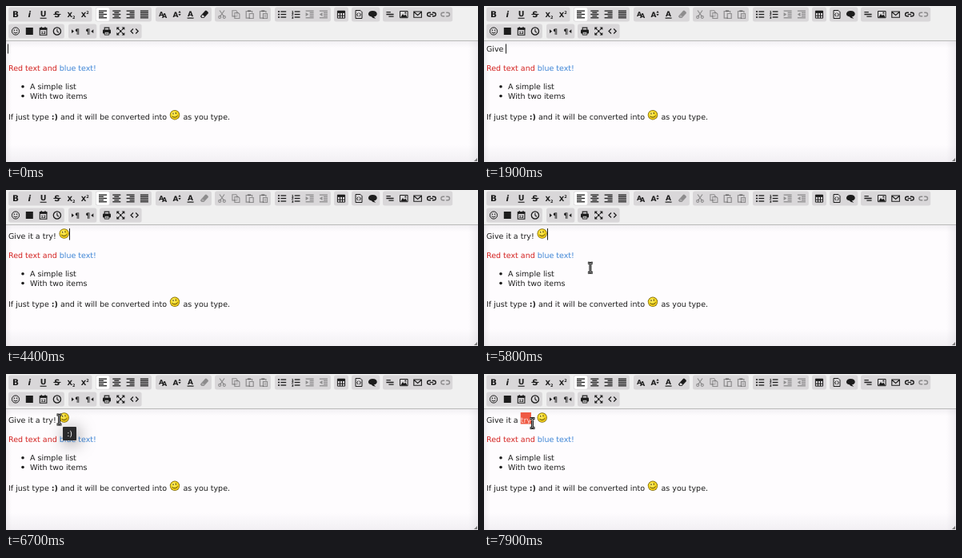
These frames come from a looping animation (590 by 195 pixels, 8 s). An HTML page with a canvas:

```html
<!DOCTYPE html>
<html lang="en">
<head>
<meta charset="utf-8">
<title>Editor demo</title>
<style>
  html, body { margin: 0; width: 100%; height: 100%; overflow: hidden; background: #fdfcfd; }
  canvas { display: block; width: 590px; height: 195px; }
</style>
</head>
<body>
<canvas id="stage"></canvas>
<script>
const W = 590, H = 195, LOOP = 8000, STEP = 100;
const FAMILY = '"DejaVu Sans", Verdana, sans-serif';
const BODY = '9.5px ' + FAMILY;
const INK = '#1c1c1c', RED = '#d3211f', BLUE = '#3f86d6', GROUP = '#d9d7d9';
const canvas = document.getElementById('stage');
const ratio = window.devicePixelRatio || 1;
canvas.width = W * ratio;
canvas.height = H * ratio;
const ctx = canvas.getContext('2d');
ctx.textRendering = 'geometricPrecision';

// ---------- helpers ----------
function rect(x, y, w, h, color) {
  if (color) ctx.fillStyle = color;
  ctx.fillRect(x, y, w, h);
}
function box(x, y, w, h, r, color) {
  ctx.fillStyle = color;
  ctx.beginPath();
  ctx.roundRect(x, y, w, h, r);
  ctx.fill();
}
function line(d, w = 1.2) {
  ctx.lineWidth = w;
  ctx.stroke(new Path2D(d));
}
function solid(d, color = INK) {
  ctx.fillStyle = color;
  ctx.fill(new Path2D(d));
}
function ring(x, y, r, w = 1.2) {
  ctx.lineWidth = w;
  ctx.beginPath();
  ctx.arc(x, y, r, 0, 7);
  ctx.stroke();
}
function dot(x, y, r, color = INK) {
  ctx.fillStyle = color;
  ctx.beginPath();
  ctx.arc(x, y, r, 0, 7);
  ctx.fill();
}
function glyph(s, x, y, font, color = INK) {
  ctx.font = font + ' ' + FAMILY;
  ctx.textAlign = 'center';
  ctx.fillStyle = color;
  ctx.fillText(s, x, y);
}
function width(s, font = BODY) {
  ctx.font = font;
  return ctx.measureText(s).width;
}
function write(s, x, y, color = INK, font = BODY) {
  ctx.font = font;
  ctx.textAlign = 'left';
  ctx.fillStyle = color;
  ctx.fillText(s, x, y);
  return x + ctx.measureText(s).width;
}
const bars = (...rows) => rows.forEach(([x, w], i) => rect(x, i * 2.15 - 5, w, 1.3, INK));
const listRows = mark => [-3.5, 0, 3.5].forEach((y, i) => {
  mark(y, i);
  rect(-1.6, y - 0.65, 6.8, 1.3, INK);
});
const dent = arrow => {
  bars([-5, 10], [0, 5], [0, 5], [0, 5], [-5, 10]);
  solid(arrow);
};
const chain = () => {
  line('M-1 -2.3H-3A2.3 2.3 0 0 0 -3 2.3H-1M1 -2.3H3A2.3 2.3 0 0 1 3 2.3H1', 1.4);
};

// ---------- toolbar icons, drawn around 0,0 ----------
const icons = {
  bold() { glyph('B', 0, 3.6, 'bold 10.5px'); },
  italic() { glyph('i', 0, 3.6, 'italic bold 10.5px'); },
  underline() { glyph('U', 0, 2.8, 'bold 9.5px'); rect(-4, 4.2, 8, 1.1, INK); },
  strike() { glyph('S', 0, 3.6, 'bold 10px'); rect(-4.5, -0.6, 9, 1.1, INK); },
  sub() { glyph('X', -1.5, 3.2, 'bold 8.5px'); glyph('2', 3.6, 5, 'bold 5px'); },
  sup() { glyph('X', -1.5, 3.8, 'bold 8.5px'); glyph('2', 3.6, -1, 'bold 5px'); },
  left() { bars([-5, 10], [-5, 6], [-5, 10], [-5, 6], [-5, 10]); },
  center() { bars([-5, 10], [-3, 6], [-5, 10], [-3, 6], [-5, 10]); },
  right() { bars([-5, 10], [-1, 6], [-5, 10], [-1, 6], [-5, 10]); },
  justify() { bars([-5, 10], [-5, 10], [-5, 10], [-5, 10], [-5, 10]); },
  font() { glyph('A', -2, 2, 'bold 8px'); glyph('A', 2.2, 4.4, 'bold 8px'); },
  size() { glyph('A', -1.4, 3.6, 'bold 9px'); solid('M2 -2L3.7 -4.4L5.4 -2ZM2 -0.6L3.7 1.8L5.4 -0.6Z'); },
  color() { glyph('A', 0, 2.6, 'bold 9px'); rect(-4, 4, 8, 1.2, INK); },
  eraser() {
    solid('M-4.8 2L1 -4.6Q2 -5.4 3 -4.6L4.6 -3Q5.4 -2 4.6 -1L-0.6 4.4H-3.2L-4.8 3Z');
    solid('M-3.6 2.3L-2.1 0.6L0.3 2.6L-1.1 3.7H-2.6Z', GROUP);
  },
  cut() { line('M-3 -5L2 2M3 -5L-2 2', 1.2); ring(-2.8, 3.4, 1.5, 1.1); ring(2.8, 3.4, 1.5, 1.1); },
  copy() {
    const sheet = 'M-1.4 -2H3L4.6 -0.4V5H-1.4Z';
    line('M-4.4 -4.8H0.4L1.6 -3.4V2.4H-4.4Z', 1.1);
    solid(sheet, GROUP);
    line(sheet, 1.1);
  },
  paste() { line('M0 4.6H-4.4V-4H3V-2'); rect(-2.6, -5.3, 4, 2, INK); line('M-0.4 -1H4.6V5H-0.4Z'); },
  pasteText() { icons.paste(); line('M1 1H3.2M1 3H3.2', 0.9); },
  bullets() { listRows(y => dot(-4, y, 1.1)); },
  numbers() { listRows((y, i) => glyph(i + 1, -4, y + 1.5, 'bold 4.2px')); },
  indent() { dent('M-5 -2.4L-1.4 0L-5 2.4Z'); },
  outdent() { dent('M-1.4 -2.4L-5 0L-1.4 2.4Z'); },
  table() {
    line('M-4.6 -4.2H4.6V4.6H-4.6ZM-4.6 1.6H4.6M-1.5 -2V4.6M1.5 -2V4.6', 1);
    rect(-4.6, -4.6, 9.2, 3, INK);
  },
  code() { line('M-4 -5H2L4 -3V5H-4Z', 1); line('M-0.8 -1.8L-2.4 0.4L-0.8 2.6M0.8 -1.8L2.4 0.4L0.8 2.6', 1); },
  quote() { solid('M0 -4.4C7 -4.4 7 2.8 1.6 2.8Q2.4 4.4 4 5Q0 5.2 -1.6 2.8C-7 2.6 -6.6 -4.4 0 -4.4Z'); },
  rule() { rect(-4.6, -3.4, 5.4, 1.2, INK); rect(-4.6, -0.8, 9.2, 1.5, INK); rect(-1.6, 2, 6.2, 1.2, INK); },
  image() { line('M-4.8 -4H4.8V4.2H-4.8Z', 1); solid('M-4 3.4L-1.4 -0.4L0.4 1.6L2 0L4.2 3.4Z'); dot(2, -1.9, 1); },
  email() { line('M-4.8 -3.5H4.8V3.8H-4.8ZM-4.6 -3L0 1L4.6 -3', 1.1); },
  link() { chain(); line('M-2.3 0H2.3', 1.4); },
  unlink() { chain(); },
  smile() { ring(0, 0, 4.6, 1); dot(-1.6, -1.3, 0.8); dot(1.6, -1.3, 0.8); line('M-2.4 1.2Q0 3.8 2.4 1.2', 1); },
  video() { rect(-4.5, -4.5, 9, 9, INK); },
  date() {
    line('M-4.3 -3.8H4.3V4.8H-4.3Z', 1.1);
    rect(-4.6, -4.2, 9.2, 2.6, INK);
    rect(-3, -5.4, 1.3, 2, INK);
    rect(1.7, -5.4, 1.3, 2, INK);
    glyph('12', 0, 3.6, 'bold 4.6px');
  },
  time() { ring(0, 0, 4.6, 1.3); line('M0 -2.8V0.2L2 1.8', 1.1); },
  ltr() { solid('M-5 -2.2L-2 0.2L-5 2.6Z'); glyph('¶', 2, 3.4, 'bold 9px'); },
  rtl() { glyph('¶', -2, 3.4, 'bold 9px'); solid('M5 -2.2L2 0.2L5 2.6Z'); },
  print() {
    line('M-2.8 -1.5V-4.4H2.8V-1.5', 1.1);
    box(-5, -2, 10, 5, 1, INK);
    rect(-2.6, 1, 5.2, 3.8, '#e2e2e2');
    line('M-2.8 0.8H2.8V4.6H-2.8ZM-1.5 2.7H1.5', 0.9);
  },
  expand() {
    line('M-4 -4L-1.6 -1.6M4 -4L1.6 -1.6M4 4L1.6 1.6M-4 4L-1.6 1.6', 1.3);
    solid('M-5 -5H-1.4L-5 -1.4ZM5 -5V-1.4L1.4 -5ZM5 5H1.4L5 1.4ZM-5 5V1.4L-1.4 5Z');
    rect(-1.3, -1.3, 2.6, 2.6, INK);
  },
  source() { line('M-1.6 -3L-4.6 0L-1.6 3M1.6 -3L4.6 0L1.6 3', 1.2); }
};
const groups = [
  [3, 10.5, 'bold italic underline strike sub sup'],
  [112, 10.5, 'left center right justify'],
  [187, 10.5, 'font size color eraser'],
  [261, 10.5, 'cut copy paste pasteText'],
  [336, 10.5, 'bullets numbers indent outdent'],
  [410, 10.5, 'table'],
  [432, 10.5, 'code quote'],
  [471, 10.5, 'rule image email link unlink'],
  [3, 31.5, 'smile video date time'],
  [78, 31.5, 'ltr rtl'],
  [117, 31.5, 'print expand source']
];
const DISABLED = new Set('cut copy paste pasteText indent outdent unlink'.split(' '));

function toolbar(eraserOn) {
  rect(0, 0, W, 44, '#f0f0f0');
  rect(0, 43, W, 1, '#b9b9b9');
  for (const [x, y, names] of groups) {
    const list = names.split(' ');
    box(x, y - 9, list.length * 17.3 + 0.7, 18, 2.5, GROUP);
    list.forEach((name, i) => {
      const cx = x + 9 + i * 17.3;
      if (name === 'left') box(cx - 8.3, y - 8.3, 16.6, 16.6, 2, '#fff');
      ctx.save();
      ctx.translate(cx, y);
      ctx.strokeStyle = INK;
      if (DISABLED.has(name) || name === 'eraser' && !eraserOn) ctx.globalAlpha = 0.4;
      icons[name]();
      ctx.restore();
    });
  }
}

// ---------- page ----------
function shade(x0, y0, x1, y1, alpha) {
  const g = ctx.createLinearGradient(x0, y0, x1, y1);
  g.addColorStop(0, `rgba(205,202,210,${alpha})`);
  g.addColorStop(1, 'rgba(205,202,210,0)');
  rect(0, 44, W, H - 44, g);
}
function page() {
  rect(0, 44, W, H - 44, '#fefcfe');
  shade(0, 44, 0, 52, 0.25);
  shade(0, H, 0, H - 22, 0.25);
  shade(0, 0, 7, 0, 0.25);
  shade(W, 0, W - 12, 0, 0.3);
  solid('M589 190V194H585Z', '#777');
}
function emoji(x, y) {
  ctx.save();
  ctx.translate(x, y);
  dot(0, 0, 6.2, '#7d6c12');
  const g = ctx.createRadialGradient(-2, -2.5, 0.5, 0, 0, 6);
  g.addColorStop(0, '#fff27a');
  g.addColorStop(0.6, '#f6da22');
  g.addColorStop(1, '#e3b914');
  dot(0, 0, 5.5, g);
  ctx.rotate(-0.15);
  ctx.strokeStyle = '#4d3f0c';
  line('M-1.7 -3V-1M1.6 -3V-1', 1.1);
  line('M-3.6 1.2Q0 4.6 3.6 1.2', 0.9);
  ctx.restore();
}
function content(shift) {
  const mid = write('Red text and ', 3, 80.5 + shift, RED);
  write('blue text!', mid, 80.5 + shift, BLUE);
  ['A simple list', 'With two items'].forEach((s, i) => {
    const y = 104 + i * 11.7 + shift;
    dot(21, y - 3.2, 1.8);
    write(s, 30, y, INK);
  });
  const y = 142.4 + shift * 0.9;
  let x = write('If just type ', 3, y);
  x = write(':)', x, y, INK, 'bold ' + BODY);
  write(' and it will be converted into', x, y);
  emoji(211, y - 6.2);
  write('as you type.', 221.5, y);
}

// ---------- timeline ----------
const TYPED = 'Give it a try! :';
const KEYS = [1200, 1500, 1700, 1800, 1900, 2100, 2300, 2400, 2600, 2700,
  2900, 3000, 3200, 3700, 3900, 4100];
const CONVERT = 4300;
const caretOn = t => !(t >= 100 && t < 600 || t >= 5000 && t < 5500 || t >= 6000);
const mix = (a, b, p) => a + (b - a) * p;
const part = (t, a, b) => Math.min(1, Math.max(0, (t - a) / (b - a)));

function pointer(t) {
  if (t < 5500) return null;
  if (t < 6900) {
    const p = 1 - (1 - part(t, 5500, 6300)) ** 1.72;
    return [mix(215, 66, p), mix(147.5, 57, p)];
  }
  if (t < 7600) {
    const p = part(t, 6800, 7400);
    return [mix(66, 46, p), mix(57, 62, p)];
  }
  const p = part(t, 7500, 7900);
  return [mix(46, 60, p), mix(62, 61.5, p)];
}
function beam(x, y) {
  const d = 'M-3 -6H-1.2L0 -5.2L1.2 -6H3M0 -5.2V5.2M-3 6H-1.2L0 5.2L1.2 6H3';
  ctx.save();
  ctx.translate(x + 0.5, y);
  ctx.strokeStyle = '#151515';
  line(d, 2.9);
  ctx.strokeStyle = '#b4b4b4';
  line(d, 0.9);
  ctx.restore();
}
function select(t, base) {
  const from = TYPED.indexOf('try');
  const count = Math.min(3, (t - 7500) / STEP);
  const x = 3 + width(TYPED.slice(0, from));
  const word = TYPED.slice(from, from + count);
  rect(x, 48, width(word), 14.5, '#ef5a44');
  write(word, x, base, '#ffd9d2');
}
function tooltip() {
  ctx.save();
  ctx.shadowColor = 'rgba(0,0,0,.5)';
  ctx.shadowBlur = 20 * ratio;
  ctx.shadowOffsetX = 2 * ratio;
  ctx.shadowOffsetY = 3 * ratio;
  box(71, 66, 17, 17, 1, '#2a2a2c');
  ctx.restore();
  glyph(':)', 79.6, 77.8, '9.5px', '#fff');
}

function draw(time) {
  const t = Math.floor(time % LOOP / STEP) * STEP;
  const done = t >= CONVERT;
  const base = done ? 61 : 57;
  const typed = done ? 'Give it a try! ' : TYPED.slice(0, KEYS.filter(k => k <= t).length);
  ctx.setTransform(ratio, 0, 0, ratio, 0, 0);
  page();
  toolbar(t < 1200 || t >= 7600);
  const end = write(typed, 3, base);
  content(done ? 4 : 0);
  if (done) emoji(72.7, 54.5);
  if (t >= 7600) select(t, base);
  if (caretOn(t)) {
    if (done) rect(79, 48, 1, 14.5, INK);
    else rect(Math.round(end - 0.6), 47.5, 1, 12, INK);
  }
  if (t >= 6700 && t < 6900) tooltip();
  const at = pointer(t);
  if (at) beam(...at);
}

const start = performance.now();
function frame() {
  draw(performance.now() - start);
  requestAnimationFrame(frame);
}
frame();
</script>
</body>
</html>
```
